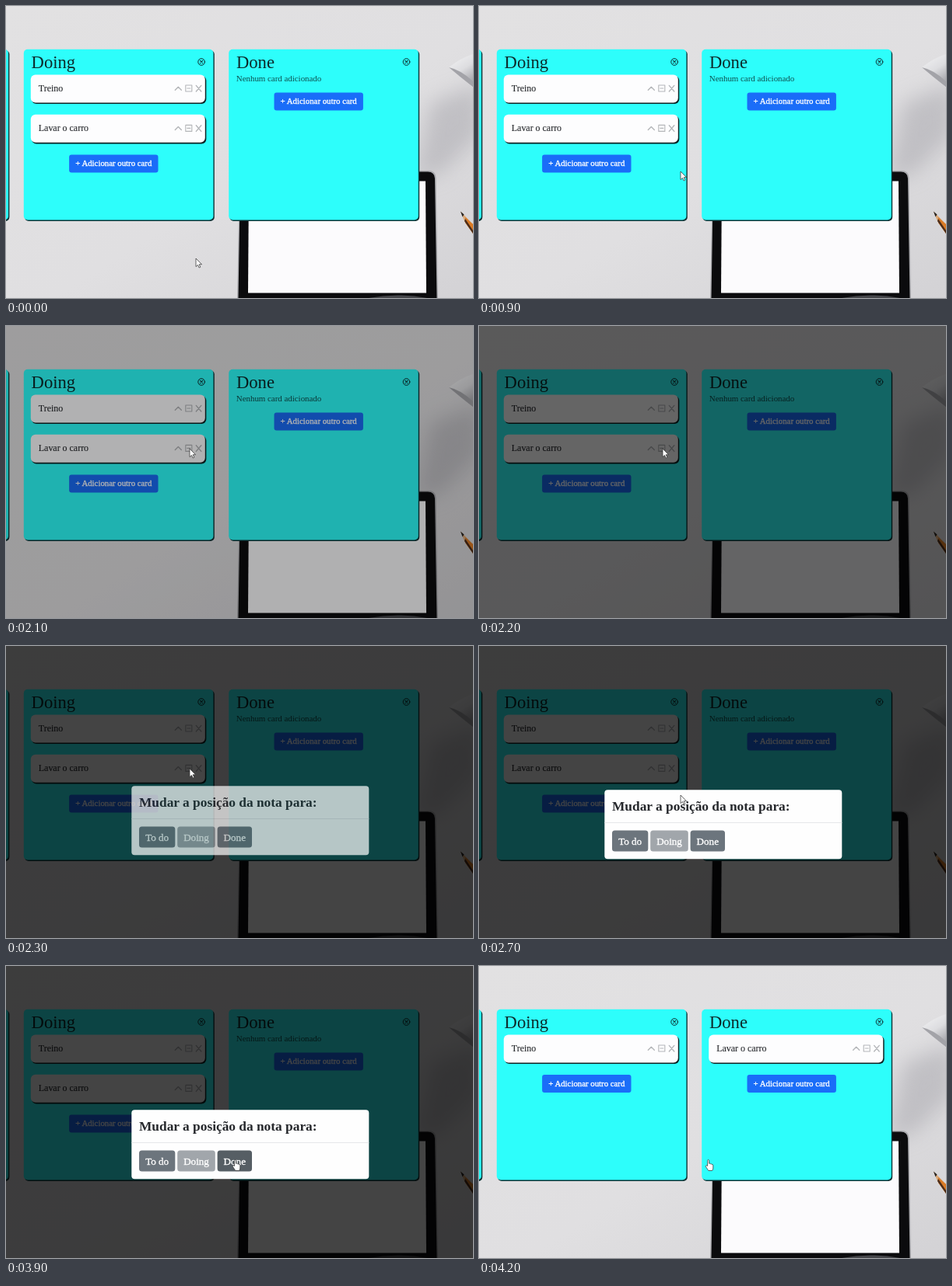
An HTML page that plays this animation: 600x376 px, repeating every 5200 ms.

```html
<!DOCTYPE html>
<html lang="pt-BR">
<head>
<meta charset="utf-8">
<title>Quadro de tarefas</title>
<style>
  html, body { margin: 0; width: 100%; height: 100%; overflow: hidden; background: #e0dfe0; }
  svg { display: block; width: 100%; height: 100%; }
  text { font-family: "Liberation Serif", "Times New Roman", serif; fill: #26282c; }
  .head { font-size: 22.6px; fill: #0c2a2b; }
  .card { font-size: 11.95px; stroke: #26282c; stroke-width: .12; }
  .empty { font-size: 10.9px; fill: #0d4d4d; }
  .btn { fill: #fff; stroke: #fff; stroke-width: .32; text-anchor: middle; }
  .line { fill: none; stroke-linecap: round; stroke-linejoin: round; }
</style>
</head>
<body>
<svg viewBox="0 0 600 376" xmlns="http://www.w3.org/2000/svg">
  <defs>
    <linearGradient id="desk" x1="0" y1="0" x2="1" y2="1">
      <stop offset="0" stop-color="#e2e1e2"/>
      <stop offset=".55" stop-color="#e0dfe1"/>
      <stop offset="1" stop-color="#d3d2d5"/>
    </linearGradient>
    <linearGradient id="lampFill" x1="0" y1="0" x2=".5" y2="1">
      <stop offset="0" stop-color="#f4f4f5"/>
      <stop offset=".6" stop-color="#dddde0"/>
      <stop offset="1" stop-color="#adadb1"/>
    </linearGradient>
    <filter id="soft" x="-60%" y="-60%" width="220%" height="220%"><feGaussianBlur stdDeviation="13"/></filter>
  </defs>

  <rect width="600" height="376" fill="url(#desk)"/>
  <path d="M610 100L545 125 525 225 560 215 610 165Z" fill="#aeadb3" opacity=".6" filter="url(#soft)"/>
  <path d="M569 79Q584 67 600 62V104Q583 91 569 79Z" fill="url(#lampFill)"/>
  <path d="M569 79Q584 82 600 97V104Q583 91 569 79Z" fill="#a3a3a8"/>

  <path d="M297 376L300 222Q300 212 309 212H543Q552 212 552.500 221L555 376Z" fill="#a9a9ad"/>
  <path d="M298.500 376L301 222Q301 213.500 309 213.500H542Q550.500 213.500 551 222L553.500 376Z" fill="#0b0b0d"/>
  <path d="M312 225.500H539L540 369.500H311Z" fill="#fcfbfd"/>
  <path d="M466 376Q503 369 541 376Z" fill="#45464a"/>

  <path d="M584 264.500L600 281V293L589 277Z" fill="#d9a878"/>
  <path d="M590 272L600 281V293L590 279Z" fill="#d97a25"/>
  <path d="M589 277L600 293V289L590 274Z" fill="#4a2d1c"/>
  <path d="M584 264.500L588.500 268.500 586.500 271.500Z" fill="#26221f"/>

  <g id="before"></g>
  <g id="after"></g>
  <rect id="dim" width="600" height="376"/>
  <g id="modal"></g>
  <path id="arrow" d="M0 0V10.600L2.500 8.400 4.100 12 5.800 11.200 4.200 7.700H7.500Z" fill="#fff" stroke="#333" stroke-width=".75" stroke-linejoin="round"/>
  <path id="hand" d="M2.600 8V1.200Q2.600 0 3.600 0T4.600 1.200V4.800Q6 4.300 6.500 5.300 7.800 4.900 8.200 6 9.800 5.700 9.800 7.300V10.500Q9.800 12.400 8.600 14H3.800Q2.800 12.500 .600 9.200 -.200 7.700 1 7.300 1.900 7.200 2.600 8Z" fill="#fff" stroke="#333" stroke-width=".75" stroke-linejoin="round"/>
</svg>
<script>
const LOOP = 5200, STEP = 100;
const el = id => document.getElementById(id);

const box = (x, y, w, h, r, fill, extra = "") =>
  `<rect x="${x}" y="${y}" width="${w}" height="${h}" rx="${r}" fill="${fill}" ${extra}/>`;
const label = (x, y, cls, text, extra = "") =>
  `<text x="${x}" y="${y}" class="${cls}" ${extra}>${text}</text>`;
const line = (d, color, width, extra = "") =>
  `<path class="line" d="${d}" stroke="${color}" stroke-width="${width}" ${extra}/>`;

function card(text, y, id) {
  const gray = "#b4b6b9";
  return box(10.2, y + 1.6, 224.3, 36, 6, "#0b2324") +
    box(9, y, 224, 36, 6, "#fdfdfe") +
    label(19, y + 21.6, "card", text) +
    line(`M194.500 ${y + 19.8}l4-4 4 4`, gray, 1.4) +
    line(`M208 ${y + 13.6}h8v8h-8zM210 ${y + 17.6}h4`, gray, 1.1, id ? `id="${id}"` : "") +
    line(`M221.500 ${y + 14}l6.500 7.600m0-7.600l-6.500 7.600`, gray, 1.4);
}

function column(x, title, cards, iconId) {
  const btnY = cards.length ? 88.5 + cards.length * 51.5 : 111.5;
  return `<g transform="translate(${x})">` +
    box(1.2, 57.3, 243.8, 219.7, 5, "#0d3436") +
    box(0, 55.7, 243.6, 219.8, 5, "#2dfefb") +
    label(9.8, 79.6, "head", title) +
    `<circle cx="228.300" cy="72" r="4.300" class="line" stroke="#0c2a2b" stroke-width="1"/>` +
    line("M226.700 70.400l3.200 3.200m0-3.200l-3.200 3.200", "#0c2a2b", 1.1) +
    cards.map((c, i) => card(c, 88.4 + i * 51.4, i ? iconId : "")).join("") +
    (cards.length ? "" : label(9.6, 97.4, "empty", "Nenhum card adicionado")) +
    box(58.3, btnY, 114.4, 23, 3, "#1a6df8") +
    label(115.5, btnY + 14.8, "btn", "+ Adicionar outro card", 'font-size="10.8"') + "</g>";
}

const board = (doing, done, iconId) =>
  column(-240.6, "", []) + column(22.8, "Doing", doing, iconId) + column(286.2, "Done", done);

const choice = (x, w, text, fill, id) =>
  box(x, 237.6, w, 27, 3.5, fill, `id="${id}"`) +
  label(x + w / 2, 255.8, "btn", text, 'font-size="13.1"');

el("before").innerHTML = board(["Treino", "Lavar o carro"], [], "moveIcon");
el("after").innerHTML = board(["Treino"], ["Lavar o carro"]);
el("modal").innerHTML =
  box(161.3, 185.3, 305, 89, 4, "#fefefe") +
  label(171, 211.5, "", "Mudar a posição da nota para:", 'font-size="17.35" font-weight="bold"') +
  box(161.3, 227, 305, 1, 0, "#e6e7e9") +
  choice(171, 46.3, "To do", "#6c757d", "todoBtn") +
  choice(220.2, 48.6, "Doing", "#a1a6ab", "doingBtn") +
  choice(271.6, 44.4, "Done", "#6c757d", "doneBtn");

// Each row: time, then values; linear between rows.
const pointer = [
  [0, 244, 325], [400, 245, 322], [600, 245, 322], [900, 259, 213], [1000, 257, 186],
  [1200, 247, 163], [1500, 235, 157], [1600, 235, 157], [1700, 236, 158], [2400, 236, 158],
  [2700, 259, 192], [3000, 259, 192], [3600, 291, 249.5]
];
const dimming = [[2000, 0], [2200, .6], [2300, .73], [3900, .73], [4000, .48], [4200, 0]];
const dialog = [[2200, 0, -16], [2300, .7, -5], [2400, 1, 0], [3900, 1, 0], [4000, .4, -8], [4100, 0, -20]];

function at(rows, t) {
  const i = rows.findIndex(r => r[0] > t);
  if (i === 0) return rows[0].slice(1);
  if (i < 0) return rows[rows.length - 1].slice(1);
  const a = rows[i - 1], b = rows[i], k = (t - a[0]) / (b[0] - a[0]);
  return a.slice(1).map((v, j) => v + (b[j + 1] - v) * k);
}

const show = (id, on) => el(id).setAttribute("display", on ? "inline" : "none");

function draw(time) {
  const t = Math.floor((time % LOOP) / STEP) * STEP;
  const [x, y] = at(pointer, t);
  const [alpha] = at(dimming, t);
  const [opacity, shift] = at(dialog, t);
  const pointing = t >= 3500;

  show("before", t < 4000);
  show("after", t >= 4000);
  el("dim").setAttribute("opacity", alpha);
  el("modal").setAttribute("opacity", opacity);
  el("modal").setAttribute("transform", `translate(0 ${shift})`);
  el("moveIcon").setAttribute("stroke", t >= 1400 && t < 2100 ? "#2b4468" : "#b4b6b9");
  el("doneBtn").setAttribute("fill", pointing ? "#565e64" : "#6c757d");

  show("arrow", !pointing);
  show("hand", pointing);
  el(pointing ? "hand" : "arrow").setAttribute("transform", `translate(${x} ${y})`);
}

function tick() {
  draw(performance.now());
  requestAnimationFrame(tick);
}
tick();
</script>
</body>
</html>
```
